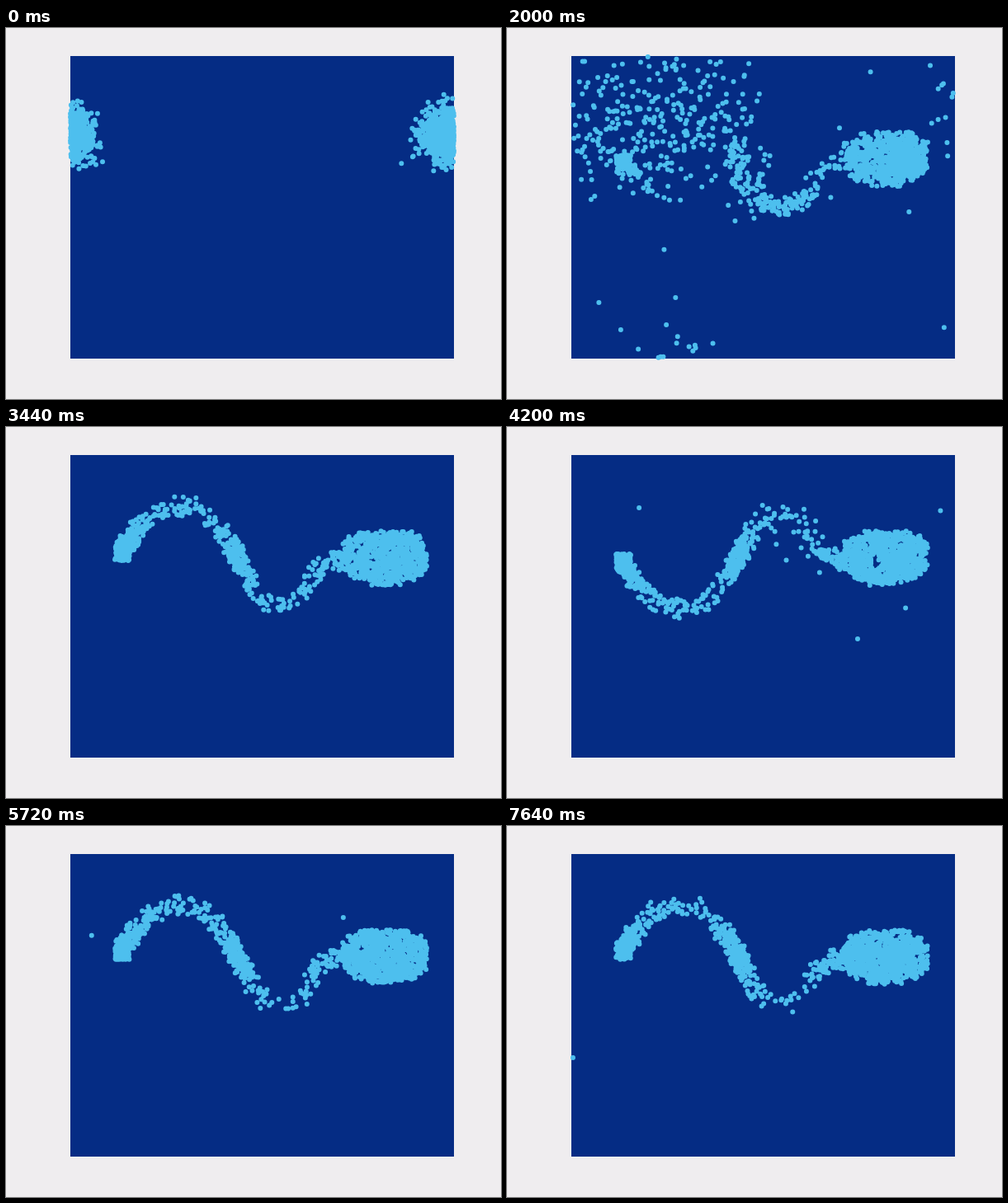
Animation, 600 px wide and 450 px high, one loop 7.68 s. Source, as an HTML page with a canvas:

```html
<!DOCTYPE html>
<html lang="en">
<head>
<meta charset="utf-8">
<title>Swarm</title>
<style>
html, body { margin: 0; width: 100%; height: 100%; overflow: hidden; background: #efedef; }
canvas { display: block; }
</style>
</head>
<body>
<canvas id="stage" width="600" height="450"></canvas>
<script>
const STEP = 40, FRAMES = 192, COUNT = 1350;
const BOX = { x: 78, y: 34, w: 465, h: 367 };
const AXIS = 158, NECK = 400, TAIL_START = 135, SWEEP = 28, CELL = 6;
// frames at which the tail starts to flip over
const FLIPS = [44, 65, 87, 118, 144, 166];
const TAIL = [
  [141, 151], [149, 138], [162, 118], [182, 102], [205, 97], [232, 97],
  [249, 112], [267, 133], [279, 158], [291, 182], [305, 205], [325, 218],
  [348, 214], [366, 196], [380, 170], [410, 158]
];

let seed = 20719;
function rand() {
  seed = (seed + 0x6D2B79F5) | 0;
  let t = Math.imul(seed ^ (seed >>> 15), 1 | seed);
  t = (t + Math.imul(t ^ (t >>> 7), 61 | t)) ^ t;
  return ((t ^ (t >>> 14)) >>> 0) / 4294967296;
}
const gauss = () =>
  Math.sqrt(-2 * Math.log(1 - rand())) * Math.cos(2 * Math.PI * rand());

const wrap = (v, lo, size) => lo + ((v - lo) % size + size) % size;
const wrapX = x => wrap(x, BOX.x, BOX.w);
const wrapY = y => wrap(y, BOX.y, BOX.h);

function segmentDistance(x, y, a, b) {
  const dx = b[0] - a[0], dy = b[1] - a[1];
  let t = ((x - a[0]) * dx + (y - a[1]) * dy) / (dx * dx + dy * dy);
  t = Math.max(0, Math.min(1, t));
  return Math.hypot(x - a[0] - t * dx, y - a[1] - t * dy);
}

function inFigure(x, y) {
  const u = Math.abs(x - 459) / 51, v = Math.abs(y - 157) / 33;
  if (u ** 2.7 + v ** 2.7 < 1) return true;
  return TAIL.some((p, i) => i && segmentDistance(x, y, TAIL[i - 1], p) < 11);
}

const COLS = 100, ROWS = 75;
const grid = new Uint8Array(COLS * ROWS);
for (let r = 0; r < ROWS; r++) {
  for (let c = 0; c < COLS; c++) {
    grid[r * COLS + c] = inFigure((c + 0.5) * CELL, (r + 0.5) * CELL) ? 1 : 0;
  }
}

function filled(x, y, mirrored) {
  if (mirrored && x < NECK) y = 2 * AXIS - y;
  const c = Math.floor(x / CELL), r = Math.floor(y / CELL);
  return r >= 0 && r < ROWS && grid[r * COLS + c] === 1;
}

// The flip runs along the tail from its tip to the neck.
function maskAt(frame) {
  const phase = FLIPS.filter(f => f <= frame).length;
  const now = phase % 2 === 1;
  if (!phase) return (x, y) => filled(x, y, false);
  const front = TAIL_START + (frame - FLIPS[phase - 1]) * SWEEP;
  return (x, y) =>
    (x < front + 35 && filled(x, y, now)) || (x > front && filled(x, y, !now));
}

// A free dot wanders for `wait` frames, then heads for its target.
function release(p, tx, ty, wait) {
  Object.assign(p, { free: true, age: 0, tx, ty, wait });
}

// Small steps that never leave the figure
function jostle(p, frame, mask) {
  const head = p.x >= NECK;
  let size = head ? 5 : 3.5;
  if (frame < 22) size = 0.8;
  else if (head && frame < 60) size = 9;
  for (let k = 0; k < 3; k++) {
    const x = p.x + gauss() * size, y = p.y + gauss() * size;
    if (x >= NECK === head && mask(x, y)) {
      p.x = x;
      p.y = y;
      return;
    }
  }
}

// Wide random steps that end at the first contact with the figure
function wander(p, mask) {
  const homing = p.age > p.wait, jump = p.stray && !p.age;
  const size = jump ? 40 : homing ? 13 : Math.min(28, 16 + 3 * p.age);
  let dx = gauss() * size, dy = gauss() * size;
  if (homing) {
    dx += (p.tx - p.x) * 0.5;
    dy += (p.ty - p.y) * 0.5;
  }
  const parts = Math.max(1, Math.ceil(Math.hypot(dx, dy) / 4));
  const x0 = p.x, y0 = p.y;
  for (let k = jump ? parts : 1; k <= parts; k++) {
    p.x = wrapX(x0 + dx * k / parts);
    p.y = wrapY(y0 + dy * k / parts);
    if (mask(p.x, p.y)) {
      p.free = p.stray = false;
      return;
    }
  }
  p.age++;
}

function makeDot() {
  const p = {
    x: wrapX(BOX.x - 7 + gauss() * 15),
    y: wrapY(130 + gauss() * 15),
    stray: false
  };
  const spot = TAIL[Math.floor(rand() * TAIL.length)];
  const [tx, ty] = rand() < 0.5 ? spot : [459, 157];
  release(p, tx, ty, 6 + rand() * 13);
  return p;
}

function simulate() {
  const dots = Array.from({ length: COUNT }, makeDot);
  const track = [];
  for (let f = 0; f < FRAMES; f++) {
    if (f) {
      const mask = maskAt(f);
      for (const p of dots) {
        if (!p.free && !mask(p.x, p.y)) {
          release(p, p.x, 2 * AXIS - p.y, 5);
        } else if (!p.free && rand() < 0.0003) {
          p.stray = true;
          release(p, p.x, p.y, 8);
        }
        if (p.free) wander(p, mask);
        else jostle(p, f, mask);
      }
    }
    const row = new Float32Array(COUNT * 2);
    dots.forEach((p, i) => row.set([p.x, p.y], i * 2));
    track.push(row);
  }
  return track;
}

const ctx = document.getElementById("stage").getContext("2d");
const track = simulate();

function draw(frame) {
  ctx.fillStyle = "#efedef";
  ctx.fillRect(0, 0, 600, 450);
  ctx.fillStyle = "#052c84";
  ctx.fillRect(BOX.x, BOX.y, BOX.w, BOX.h);
  ctx.fillStyle = "#4dbfee";
  ctx.beginPath();
  const row = track[frame];
  for (let i = 0; i < row.length; i += 2) {
    ctx.moveTo(row[i] + 3, row[i + 1]);
    ctx.arc(row[i], row[i + 1], 3, 0, 2 * Math.PI);
  }
  ctx.fill();
}

const start = performance.now();
function tick() {
  const t = performance.now() - start;
  draw(Math.floor(t / STEP) % FRAMES);
  requestAnimationFrame(tick);
}
tick();
</script>
</body>
</html>
```
